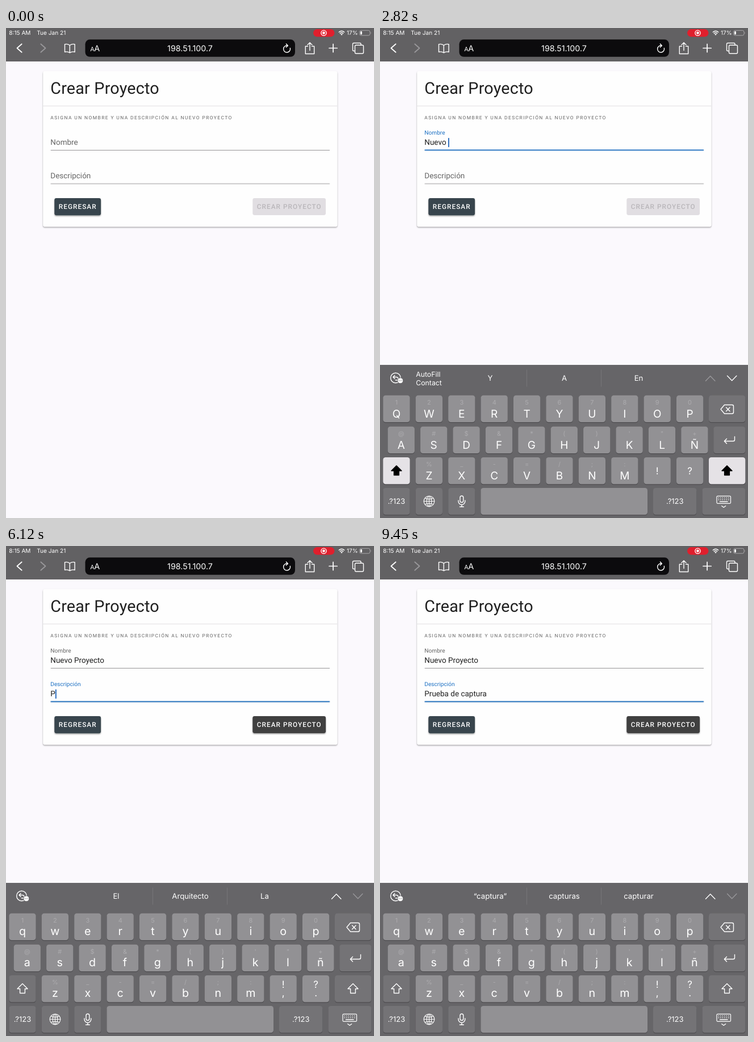
Animation, 648 px wide and 864 px high, one loop 9480 ms. Source, as an HTML page:

```html
<!DOCTYPE html>
<html lang="es">
<head>
<meta charset="utf-8">
<title>Crear Proyecto</title>
<style>
  html, body { margin: 0; width: 100%; height: 100%; overflow: hidden; background: #fbf9fd; }
  svg { display: block; width: 648px; height: 864px; }
  text { font-family: Inter, "Open Sans", sans-serif; fill: #fff; white-space: pre; text-rendering: geometricPrecision; }
  .page text { font-family: Roboto, "Open Sans", sans-serif; fill: #1f1f1f; }
  .mid { text-anchor: middle; }
  .ico { fill: none; stroke: #fff; stroke-width: 1.4; stroke-linecap: round; stroke-linejoin: round; }
  .dim { stroke: #99989b; }
  .key { fill: #929194; }
  .fn { fill: #747376; }
  .key.down { fill: #747376; }
  .fn.lit { fill: #e5e2e6; }
  .hint { font-size: 11px; fill: #acabae; }
  .sug { font-size: 13.2px; }
  .btn { font-size: 11.81px; font-weight: 500; letter-spacing: 1.055px; }
  .page .btn { fill: #fff; }

  .page .off { fill: #b9b6ba; }
  .label, .bar, #kb { animation: 9480ms infinite; }
  .page .label { font-size: 13.5px; fill: #666; }
  .bar { fill: #1f72c4; transform: scaleX(0); }
  #kb { transform: translateY(270px); animation-name: rise; }
  #label0 { animation-name: float0; }
  #label1 { animation-name: float1; }
  #bar0 { animation-name: bar0; }
  #bar1 { animation-name: bar1; }

  @keyframes rise {
    0%, 4% { transform: translateY(270px); animation-timing-function: cubic-bezier(.3, .7, .2, 1); }
    8.1%, 100% { transform: none; }
  }
  @keyframes float0 {
    0%, 3.5% { transform: none; fill: #666; animation-timing-function: cubic-bezier(.25, .8, .5, 1); }
    6.6%, 54.4% { transform: translateY(-18.5px) scale(.75); fill: #1f72c4; }
    56.5%, 100% { transform: translateY(-18.5px) scale(.75); fill: #666; }
  }
  @keyframes float1 {
    0%, 54.4% { transform: none; fill: #666; animation-timing-function: cubic-bezier(.25, .8, .5, 1); }
    57.5%, 100% { transform: translateY(-18.5px) scale(.75); fill: #1f72c4; }
  }
  @keyframes bar0 {
    0%, 3.5% { transform: scaleX(0); animation-timing-function: cubic-bezier(.25, .8, .5, 1); }
    6.6%, 54.4% { transform: none; animation-timing-function: cubic-bezier(.25, .8, .5, 1); }
    57.5%, 100% { transform: scaleX(0); }
  }
  @keyframes bar1 {
    0%, 54.4% { transform: scaleX(0); animation-timing-function: cubic-bezier(.25, .8, .5, 1); }
    57.5%, 100% { transform: none; }
  }
</style>
</head>
<body>
<svg viewBox="0 0 648 864">
  <defs>
    <filter id="lift" x="-10%" y="-10%" width="120%" height="130%">
      <feDropShadow dx="0" dy="1.4" stdDeviation="1.1" flood-opacity=".42"/>
    </filter>
  </defs>
  <rect width="648" height="864" fill="#fbf9fd"/>

  <g class="page">
    <rect x="65.3" y="76" width="518" height="274.3" rx="3.4" fill="#fefefe" filter="url(#lift)"/>
    <text x="78.3" y="116.2" font-size="28.69" letter-spacing=".21">Crear Proyecto</text>
    <rect x="65.3" y="137" width="518" height="1" fill="#e2e0e3"/>
    <text x="78.3" y="160.5" font-size="8.44" letter-spacing="1.406" style="fill:#666">ASIGNA UN NOMBRE Y UNA DESCRIPCIÓN AL NUEVO PROYECTO</text>
    <g id="fields"></g>
    <rect x="85.3" y="300" width="81.8" height="30.2" rx="3.4" fill="#37454d" filter="url(#lift)"/>
    <text class="btn" x="92.8" y="319">REGRESAR</text>
    <rect id="send" x="434.3" y="300" width="128.8" height="30" rx="3.4"/>
    <text id="sendText" class="btn" x="441.8" y="319">CREAR PROYECTO</text>
  </g>

  <g>
    <rect width="648" height="59" fill="#626163"/>
    <g font-size="10.1">
      <text x="5.3" y="12.3">8:15 AM</text>
      <text x="54.3" y="12.3">Tue Jan 21</text>
      <text x="600" y="12.3">17%</text>
    </g>
    <rect x="541" y="2" width="37.5" height="13.6" rx="6.8" fill="#e01f2d"/>
    <circle class="ico" cx="559.5" cy="8.7" r="4.6" stroke-width="1"/>
    <circle cx="559.5" cy="8.7" r="2.4" fill="#fff"/>
    <path class="ico" d="M586.3 7.3q4.7-4.2 9.4 0M588.2 9.5q2.8-2.5 5.6 0"/>
    <path d="M591 13l-1.9-2q1.9-1.6 3.8 0z" fill="#fff"/>
    <rect x="622.5" y="4.3" width="18.5" height="8.8" rx="2.7" fill="none" stroke="#a9a8aa"/>
    <rect x="624" y="5.8" width="3" height="5.8" rx="1" fill="#fff"/>
    <path d="M642.2 7.2q1.6 1.5 0 3z" fill="#a9a8aa"/>

    <rect x="139.5" y="20.3" width="369.5" height="30.5" rx="8" fill="#0c0b0d"/>
    <text x="148.2" y="41" font-size="10.6">A</text>
    <text x="155.2" y="41" font-size="14.4">A</text>
    <text class="mid" x="324" y="41" font-size="14.3">198.51.100.7</text>
    <g class="ico">
      <path d="M27.7 28.3l-8.2 7.2 8.2 7.2" stroke-width="1.8"/>
      <path class="dim" d="M61.3 28.3l8.2 7.2-8.2 7.2" stroke-width="1.8"/>
      <path d="M112.3 30.5q-4-3-8.8-1.7v13.5q5-1.3 8.8 1.4q3.8-2.7 8.8-1.4V28.8q-4.8-1.3-8.8 1.7v13"/>
      <path d="M496.2 31.2a6 6 0 1 0 4.2 4.3M493.4 28l3 3.2-3.2 2.8"/>
      <path d="M531.5 32.3h-4.2v13.2h15.4V32.3h-4.2M535 39.500V26M531 29.700l4-4 4 4"/>
      <path d="M569 35.500h14.200M576.100 28.400v14.200" stroke-width="1.700"/>
      <path d="M614.500 40.500h-2q-2 0-2-2V28.500q0-2 2-2h10.500q2 0 2 2v1.600"/>
      <rect x="614.500" y="30.200" width="15" height="14.800" rx="2"/>
    </g>
  </g>

  <g id="kb">
    <rect y="594" width="648" height="290" fill="#666568"/>
    <g class="ico" stroke-width="1.2">
      <circle cx="27.500" cy="617" r="8.800"/>
      <path d="M26 612.500l-3 3 3 3M23.200 615.500h5.800q3 .5 3 3t-3 2.500h-1.500"/>
    </g>
    <circle cx="35.800" cy="621.800" r="5" fill="#fff" stroke="#666568"/>
    <path d="M33.500 621.800h.1M35.800 621.800h.1M38.100 621.800h.1" stroke="#666568" stroke-width="1.300" stroke-linecap="round"/>
    <g id="autofill" font-size="12.3">
      <text x="63.200" y="615">AutoFill</text>
      <text x="63.200" y="629.600">Contact</text>
    </g>
    <rect id="pick" x="259" y="599.500" width="131" height="36" rx="4.500" fill="#504f52"/>
    <path id="split" stroke="#777679" fill="none"/>
    <g id="sugs"></g>
    <path id="prev" class="ico" d="M573.500 622.200l8.200-8.400 8.200 8.400"/>
    <path id="next" class="ico" d="M611.500 613.300l8.200 8.400 8.200-8.400"/>
    <g id="keys"></g>
    <g class="ico">
      <path d="M606.500 664.500h13.500q2.500 0 2.500 2.500v10.500q0 2.500-2.500 2.500h-13.500l-6.500-7.700zM609.500 669l6.500 6.700M616 669l-6.500 6.700"/>
      <path d="M624.500 720.500v5.500q0 2.500-2.500 2.500H606.500M610.500 724.300l-4.200 4.200 4.200 4.200"/>
      <g stroke-width="1.100">
        <circle cx="86.500" cy="834.500" r="9.300"/>
        <ellipse cx="86.500" cy="834.500" rx="4.300" ry="9.300"/>
        <path d="M86.500 825.200v18.600M77.200 834.500h18.600M79.300 829.300q7.200 3 14.400 0M79.300 839.700q7.200-3 14.400 0"/>
      </g>
      <rect x="141" y="825" width="5.800" height="11.500" rx="2.900"/>
      <path d="M138 833v1.500a5.900 5.900 0 0 0 11.800 0V833M143.900 840.500v3.700M140.500 844.200h6.800"/>
      <rect x="593" y="825.300" width="24.500" height="13" rx="1.500" stroke-width="1.200"/>
      <path d="M595.800 828.500h19M595.800 831.800h19" stroke-dasharray="1.200 2.300" stroke-width="1.600" stroke-linecap="butt"/>
      <path d="M598.500 835.200h13.500M601.700 842.800l3.500 2.500 3.500-2.500"/>
      <path class="arrow" d="M29 771.800l9 9h-4.600v7.700h-8.800v-7.700H20z"/>
      <path class="arrow" d="M611 771.800l9 9h-4.600v7.700h-8.800v-7.700H602z"/>
    </g>
  </g>
</svg>

<script>
const LOOP = 9480, LEFT = 78.3, PITCH = 57.4, KEY_W = 47.2, KEY_H = 47.3;
const FOCUS = [330, 5160], SHIFT = 2760, PRESS = 110;
const CAPS = [[0, 1380], [SHIFT, 3150], [5200, 6060]];
const ROWS = [
  { x: 5.4, y: 647.7, keys: "qwertyuiop", hints: "1234567890" },
  { x: 13.7, y: 702.7, keys: "asdfghjklñ", hints: "@#$&*()'\"+" },
  { x: 62.8, y: 757, keys: "zxcvbnm", hints: "%_-=/;:" }
];
// field, text, time of each keystroke
const TYPING = [
  [0, "Nuevo ", [1310, 1640, 1970, 2170, 2390, 2620]],
  [0, "Proyecto", [3080, 3240, 3410, 3570, 3740, 3900, 4080, 4350]],
  [1, "Prueba ", [6010, 6200, 6370, 6540, 6690, 6850, 7010]],
  [1, "de ", [7260, 7440, 7590]],
  [1, "captura", [7800, 7970, 8160, 8360, 8550, 8720, 8900]]
];
const STROKES = TYPING.flatMap(([field, text, times]) =>
  [...text].map((ch, i) => ({ field, ch, at: times[i] })));
// start time, three suggestions
const HINTS = [
  [0, "|Nilo Brasa|"], [1430, "“N”|No|Nos"], [1770, "“Nu”|Nuevo|Nunca"],
  [2080, "“Nue”|Nuevo|Nueva"], [2480, "“Nuevo”|Nuevos|Nueva"], [2700, "Y|A|En"],
  [3190, "“P”|Para|Por"], [3360, "“Pr”|Pro|Pero"], [3520, "“Pro”|Pronto|Proyecto"],
  [3840, "“Proye”|Proyecto|Proyectos"], [4110, "“Proyect”|Proyecto|Proyectos"],
  [4440, "“Proyecto”|Proyectos|Proyecta"], [5200, "El|Arquitecto|La"],
  [6150, "“P”|Para|Por"], [6480, "“Pru”|Prueba|Pruebas"], [6940, "“Prueba”|Pruebas|Probar"],
  [7110, "de|del|que"], [7350, "“d”|de|del"], [7540, "de|del|desde"], [7690, "la|los|que"],
  [7900, "“c”|con|como"], [8250, "“cap”|capaz|capital"],
  [8640, "“captu”|captura|capturar"], [9000, "“captura”|capturas|capturar"]
];
const PICK = [4110, 4350];

const $ = id => document.getElementById(id);
const within = (t, [a, b]) => t >= a && t < b;
const show = (node, on) => node.setAttribute("visibility", on ? "inherit" : "hidden");

$("fields").innerHTML = [206.3, 265.4].map((y, i) => `
  <g transform="translate(${LEFT} ${y})">
    <rect x=".4" y="8.700" width="491.300" height="1" fill="#959396"/>
    <rect id="bar${i}" class="bar" x=".4" y="8.100" width="491.300" height="1.800" style="transform-origin:246px 0"/>
    <rect id="mark${i}" y="-13.600" height="17.500" fill="#d0e0ee"/>
    <text id="label${i}" class="label">${["Nombre", "Descripción"][i]}</text>
    <text id="value${i}" font-size="13.5"></text>
    <rect id="caret${i}" y="-12.600" width="2" height="16.500" rx=".8" fill="#2f70c0"/>
  </g>`).join("");

const keyRect = (x, y, w, cls, id = "") => `
  <rect x="${x}" y="${y + 1.2}" width="${w}" height="${KEY_H}" rx="4.500" fill="#4e4d50"/>
  <rect class="${cls}" data-key="${id}" x="${x}" y="${y}" width="${w}" height="${KEY_H}" rx="4.500"/>`;

const letters = ROWS.map(({ x, y, keys, hints }) => [...keys].map((ch, i) => {
  const left = x + i * PITCH, mid = left + KEY_W / 2;
  const hint = hints[i].replace("&", "&amp;");
  return keyRect(left, y, KEY_W, "key", ch) +
    `<text class="hint mid" x="${mid}" y="${y + 16.3}">${hint}</text>
     <text class="letter mid" data-ch="${ch}" data-y="${y}" x="${mid}"></text>`;
}).join("")).join("");

const marks = ["!,", "?."].map((pair, i) => {
  const left = 62.8 + (7 + i) * PITCH, mid = left + KEY_W / 2;
  return keyRect(left, 757, KEY_W, "key") +
    `<text class="top mid" x="${mid}" font-size="17">${pair[0]}</text>
     <text class="low mid" x="${mid}" y="793.500" font-size="17">${pair[1]}</text>`;
}).join("");

$("keys").innerHTML = letters + marks +
  keyRect(579, 647.7, 64.3, "fn") + keyRect(587.3, 702.7, 56, "fn") +
  keyRect(5.4, 757, 47.2, "fn shift") + keyRect(579, 757, 64.3, "fn shift") +
  [[5.4, 47.2], [62.8, 47.2], [120.2, 47.2], [481, 76.3], [567.5, 75.8]]
    .map(([x, w]) => keyRect(x, 811, w, "fn")).join("") +
  keyRect(177.5, 811, 293.5, "key", " ") +
  [29, 519.3].map(x => `<text class="mid" x="${x}" y="839.300" font-size="13">.?123</text>`).join("");

$("sugs").innerHTML = [194, 324.5, 455.5].map(x => `<text class="sug mid" x="${x}" y="622"></text>`).join("");

const all = sel => [...document.querySelectorAll(sel)];
const letterNodes = all(".letter"), topMarks = all(".top"), lowMarks = all(".low");
const shifts = all(".shift"), arrows = all(".arrow"), sugNodes = all(".sug");
const keyNodes = all(".key").filter(k => k.dataset.key);

function drawCase(upper, solo) {
  for (const n of letterNodes) {
    const ch = n.dataset.ch;
    n.textContent = upper ? ch.toUpperCase() : ch;
    n.setAttribute("y", +n.dataset.y + (upper ? 39.3 : 37.8));
    n.setAttribute("font-size", upper ? 19 : 19.7);
  }
  topMarks.forEach(n => n.setAttribute("y", solo ? 786.5 : 778.5));
  lowMarks.forEach(n => show(n, !solo));
  shifts.forEach(n => n.classList.toggle("lit", upper));
  arrows.forEach(n => {
    n.style.fill = upper ? "#000" : "none";
    n.style.stroke = upper ? "#000" : "#fff";
  });
}

function drawField(i, t, active, done) {
  const text = done.filter(s => s.field === i).map(s => s.ch).join("");
  const value = $("value" + i), mark = $("mark" + i), caret = $("caret" + i);
  value.textContent = text;
  const width = n => n ? value.getSubStringLength(0, n) : 0;
  const end = width(text.length);

  const marked = i === 0 && within(t, PICK);
  show(mark, marked);
  if (marked) {
    const start = width(text.lastIndexOf(" ") + 1) - 2;
    mark.setAttribute("x", start);
    mark.setAttribute("width", end - start + 2);
  }
  const last = Math.max(FOCUS[i] + 120, ...done.map(s => s.at));
  show(caret, active === i && t >= last && (t - last) % 1000 < 500);
  caret.setAttribute("x", end);
  return text;
}

function drawBar(t, active) {
  const words = HINTS.filter(h => h[0] <= t).pop()[1].split("|");
  sugNodes.forEach((n, i) => n.textContent = words[i]);
  const picked = within(t, PICK);
  show($("pick"), picked);
  show($("split"), !picked);
  $("split").setAttribute("d", words[0] ? "M258.5 602.5v30M389.500 602.5v30" : "M153.500 602.5v30M494.500 602.5v30");
  show($("autofill"), active < 1);
  $("prev").classList.toggle("dim", active < 1);
  $("next").classList.toggle("dim", active === 1);
}

function draw(t) {
  const active = t >= FOCUS[1] ? 1 : t >= FOCUS[0] ? 0 : -1;
  const done = STROKES.filter(s => s.at <= t);
  drawField(0, t, active, done);
  const ready = drawField(1, t, active, done) !== "";
  const send = $("send");
  send.setAttribute("fill", ready ? "#403f41" : "#e1dee2");
  send.setAttribute("filter", ready ? "url(#lift)" : "none");
  $("sendText").classList.toggle("off", !ready);

  drawCase(CAPS.some(c => within(t, c)), within(t, CAPS[1]));
  drawBar(t, active);
  const hit = done.length && t - done[done.length - 1].at < PRESS ? done[done.length - 1].ch.toLowerCase() : "";
  keyNodes.forEach(k => k.classList.toggle("down", k.dataset.key === hit));
}

let start;
function tick(now) {
  start ??= now;
  draw((now - start) % LOOP);
  requestAnimationFrame(tick);
}
draw(0);
requestAnimationFrame(tick);
</script>
</body>
</html>
```
